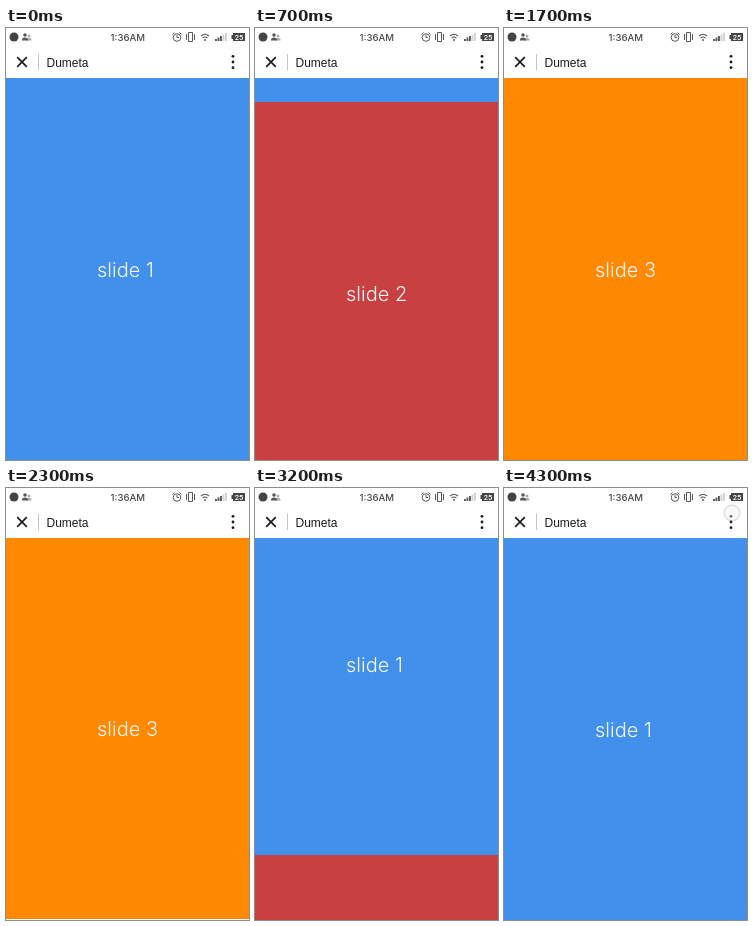
An HTML page with a canvas for the animation above (4.4 s loop, 243 by 432 pixels).

```html
<!DOCTYPE html>
<html lang="en">
<head>
<meta charset="utf-8">
<title>Vertical slides</title>
<style>
  html, body { margin: 0; width: 100%; height: 100%; overflow: hidden; background: #fff; }
  canvas { display: block; width: 243px; height: 432px; }
</style>
</head>
<body>
<canvas id="stage" width="243" height="432"></canvas>
<script>
const ctx = document.getElementById('stage').getContext('2d');
const WIDTH = 243, HEIGHT = 432, TOP = 50, SLIDE = 382;
const LOOP = 4400, STEP = 100, SETTLE = 0.24;
const COLORS = ['#4190ec', '#c84140', '#ff8903'];
const INK = '#1c1c1c', GREY = '#585858';

// Times are in steps; drag is the scroll distance reached when the finger lifts.
const swipes = [
  { down: 2, up: 6, x: 210, y0: 372, y1: 100, from: 0, drag: 280, to: SLIDE },
  { down: 12, up: 13, x: 214, y0: 375, y1: 284, from: SLIDE, drag: 103, to: 2 * SLIDE },
  { down: 19, up: 20, x: 208, y0: 350, y1: 200, from: 2 * SLIDE, drag: 105, to: 2 * SLIDE },
  { down: 25, up: 26, x: 196, y0: 200, y1: 322, from: 2 * SLIDE, drag: -122, to: SLIDE },
  { down: 30, up: 31, x: 190, y0: 210, y1: 320, from: SLIDE, drag: -110, to: 0 },
  { down: 33, up: 35, x: 189, y0: 236, y1: 374, from: 0, drag: -69.5, to: 0 },
  { down: 43, up: 43, x: 228, y0: 25, y1: 25, from: 0, drag: 0, to: 0 }
];

function poseAt(step) {
  const swipe = swipes.filter(s => s.down <= step).pop();
  if (!swipe) return { scroll: 0 };
  const { down, up, x, y0, y1, from, drag, to } = swipe;
  if (step > up) {
    const rest = (from + drag - to) * SETTLE ** (step - up);
    return { scroll: to + Math.trunc(rest) };
  }
  const part = up > down ? (step - down) / (up - down) : 1;
  return {
    scroll: from + drag * part,
    touch: { x, y: y0 + (y1 - y0) * part }
  };
}

function rect(color, x, y, w, h) {
  ctx.fillStyle = color;
  ctx.fillRect(x, y, w, h);
}

function disc(color, x, y, r) {
  ctx.fillStyle = color;
  ctx.beginPath();
  ctx.arc(x, y, r, 0, 2 * Math.PI);
  ctx.fill();
}

function stroke(color, width, path) {
  ctx.strokeStyle = color;
  ctx.lineWidth = width;
  ctx.stroke(new Path2D(path));
}

function text(label, font, color, x, y) {
  ctx.font = font;
  ctx.fillStyle = color;
  ctx.fillText(label, x, y);
}

function person(color, x, y, size) {
  disc(color, x, y, 0.5 * size);
  ctx.beginPath();
  ctx.ellipse(x, y + 1.5 * size, 0.85 * size, 0.8 * size, 0, Math.PI, 2 * Math.PI);
  ctx.fill();
}

function drawSlides(scroll) {
  COLORS.forEach((color, i) => {
    const y = TOP + i * SLIDE - scroll;
    rect(color, 0, y, WIDTH, SLIDE);
    text(`slide ${i + 1}`, '300 20px Inter, sans-serif', '#f8f8f8', 91, y + 198.5);
  });
}

function drawStatusBar() {
  disc('#444', 8, 9, 4.5);
  person('#aaa', 23, 8, 3);
  person(GREY, 19, 7, 3.6);
  text('1:36AM', '500 9.6px Inter, sans-serif', '#484848', 104.5, 12.5);

  // alarm clock
  stroke(GREY, 1, 'M167.2 9.5a3.8 3.8 0 1 0 7.6 0a3.8 3.8 0 1 0 -7.6 0M171 7v2.5h2M166.5 6.5l2-2M175.5 6.5l-2-2');
  // vibrating phone
  stroke(GREY, 1, 'M182.5 4.5h4v9h-4zM180.5 6v6M188.5 6v6');
  // wireless
  stroke(GREY, 1.1, 'M195 8q4-3.4 8 0M196.6 10q2.4-2 4.8 0');
  disc(GREY, 199, 12, 1);
  // signal
  for (let i = 0; i < 5; i++) rect(i < 3 ? GREY : '#d2d2d2', 209 + i * 2.5, 11 - i * 1.5, 1.9, 2 + i * 1.5);
  // battery
  rect('#444', 227, 5, 12, 8);
  rect('#444', 225.5, 7, 1.5, 4);
  text('25', '500 7.5px Roboto, sans-serif', '#fff', 228.8, 11.7);
}

function drawHeader() {
  rect('#fff', 0, 0, WIDTH, TOP);
  drawStatusBar();
  stroke(INK, 1.7, 'M11.2 29.2l9.6 9.6M20.8 29.2l-9.6 9.6');
  rect('#c6c3cc', 32, 26, 1, 16);
  text('Dumeta', '12px "Liberation Sans", Arial, sans-serif', INK, 40.5, 38.5);
  [28.3, 34, 39.7].forEach(y => disc(INK, 227, y, 1.4));
}

function drawTouch({ x, y }) {
  disc('rgba(240,240,240,.38)', x, y, 7.2);
  stroke('rgba(150,150,150,.3)', 1.4, `M${x - 7.8} ${y}a7.8 7.8 0 1 0 15.6 0a7.8 7.8 0 1 0 -15.6 0`);
}

function frame(now) {
  const { scroll, touch } = poseAt(Math.floor(now % LOOP / STEP));
  rect('#fff', 0, 0, WIDTH, HEIGHT);
  drawSlides(scroll);
  drawHeader();
  if (touch) drawTouch(touch);
}

function play() {
  frame(performance.now());
  requestAnimationFrame(play);
}
play();
</script>
</body>
</html>
```
